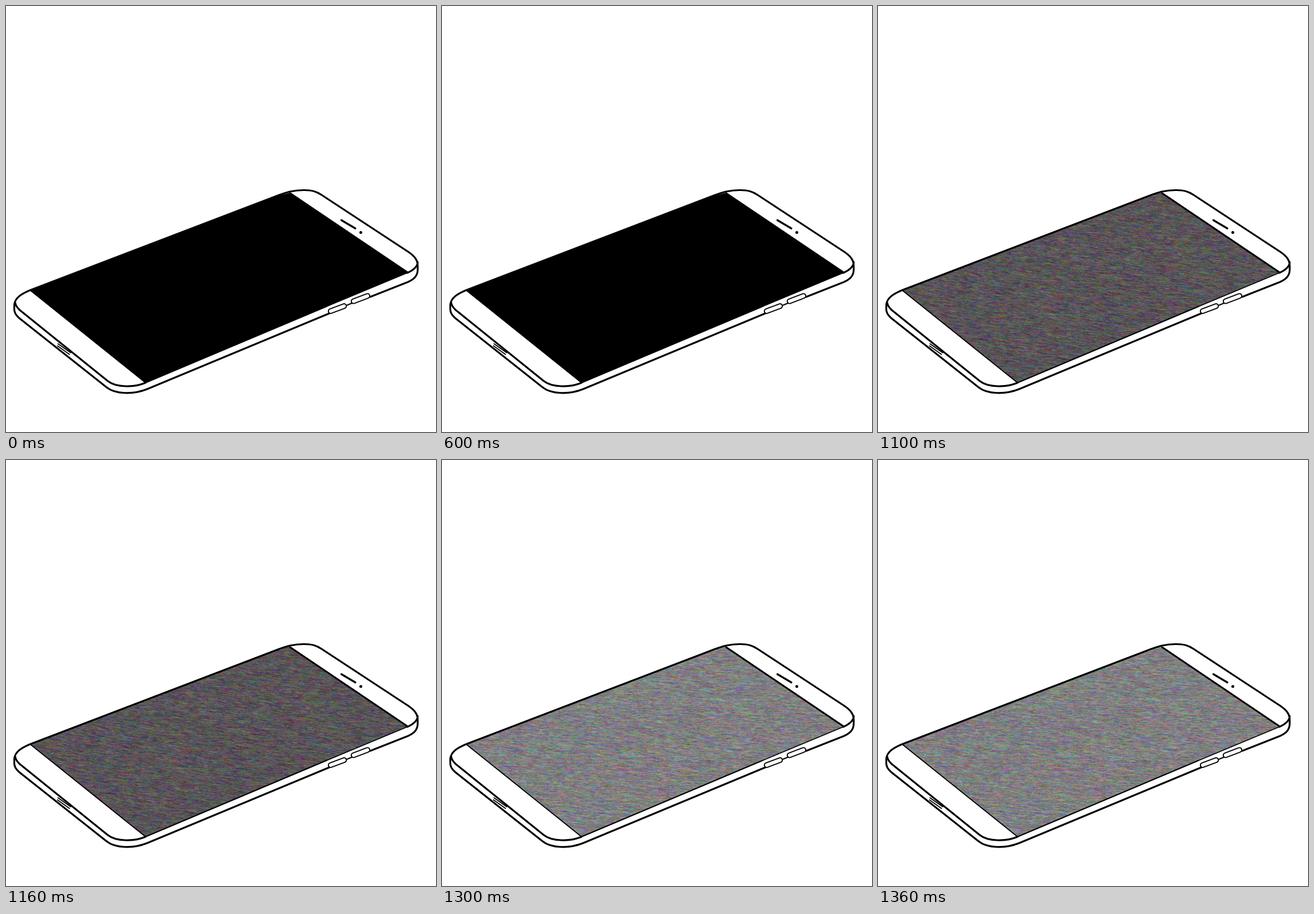
Animation, 752 px wide and 744 px high, one loop 1.4 s. Source, as an HTML page with a canvas:

```html
<!DOCTYPE html>
<html lang="en">
<head>
<meta charset="utf-8">
<title>Phone with static</title>
<style>
  html, body { margin: 0; width: 752px; height: 744px; overflow: hidden; background: #fff; }
  canvas { display: block; }
</style>
</head>
<body>
<canvas id="stage" width="752" height="744"></canvas>
<script>
const ctx = document.getElementById('stage').getContext('2d');
const LOOP = 1400, DARK = 1000, STEP = 100;

const screenPath = new Path2D('M43 497 L470 333 L497 326 L702 466 L244 658 Z');
const outerPath = new Path2D(`M43 496 L470 333 C490 325 503 321.5 521 321.5 C535 321.5 543 324 552 330
  L703 429 C715 437 720 444 720 454 V460 C720 471 714 477 703 482 L637 508
  M565 537 L247 669 C222 679 191 678 176 666 L23 545 C16 539 14.5 535 14.5 530 V522 C15.5 510 26 503 43 496`);
const rimPath = new Path2D(`M16 518 C17 525 22 530 29 535 L178 655 C192 666 223 667 244 658
  M702 466 C713 461 720 455 720 447`);

// Each burst of static: mean colour, contrast and slope of the streaks.
const bursts = [
  { mean: [153, 148, 152], contrast: 32, slope: 0.06 },
  { mean: [88, 84, 88], contrast: 19, slope: 0.14 },
  { mean: [151, 148, 149], contrast: 23, slope: 0.06 },
  { mean: [127, 127, 129], contrast: 21, slope: 0.08 }
].map((burst, i) => ({ ...burst, image: makeStatic(burst, 71 + i * 1013) }));

function seededRandom(seed) {
  return () => {
    seed = (seed + 0x6d2b79f5) | 0;
    let t = Math.imul(seed ^ (seed >>> 15), 1 | seed);
    t = (t + Math.imul(t ^ (t >>> 7), 61 | t)) ^ t;
    return ((t ^ (t >>> 14)) >>> 0) / 4294967296;
  };
}

// Coloured noise, smoothed along each row into short streaks.
function makeStatic({ mean, contrast }, seed) {
  const tile = document.createElement('canvas');
  tile.width = 700;
  tile.height = 440;
  const tileCtx = tile.getContext('2d');
  const pixels = tileCtx.createImageData(tile.width, tile.height);
  const random = seededRandom(seed);
  const keep = 0.82, gain = contrast * Math.sqrt(12 * (1 - keep * keep));
  for (let y = 0, p = 0; y < tile.height; y++) {
    const level = [0, 0, 0];
    for (let x = 0; x < tile.width; x++, p += 4) {
      for (let c = 0; c < 3; c++) {
        level[c] = level[c] * keep + (random() - 0.5) * gain;
        pixels.data[p + c] = mean[c] + level[c];
      }
      pixels.data[p + 3] = 255;
    }
  }
  tileCtx.putImageData(pixels, 0, 0);
  return tile;
}

function line(width, x1, y1, x2, y2) {
  ctx.lineWidth = width;
  ctx.beginPath();
  ctx.moveTo(x1, y1);
  ctx.lineTo(x2, y2);
  ctx.stroke();
}

function pill(x, y, length, height, angle) {
  ctx.save();
  ctx.translate(x, y);
  ctx.rotate(angle);
  ctx.lineWidth = 2;
  ctx.beginPath();
  ctx.roundRect(-length / 2, -height / 2, length, height, height / 2);
  ctx.fillStyle = '#fff';
  ctx.fill();
  ctx.stroke();
  ctx.restore();
}

function drawScreen(burst) {
  ctx.fillStyle = '#000';
  ctx.fill(screenPath);
  if (!burst) return;
  ctx.save();
  ctx.clip(screenPath);
  // Start above the screen so the sheared tile covers every corner.
  ctx.transform(1, burst.slope, 0, 1, 30, 290 - burst.slope * 350);
  ctx.drawImage(burst.image, 0, 0);
  ctx.restore();
}

function drawPhone() {
  ctx.strokeStyle = '#000';
  ctx.lineCap = ctx.lineJoin = 'round';
  ctx.lineWidth = 3.2;
  ctx.stroke(outerPath);
  ctx.stroke(rimPath);

  line(1.8, 43, 497, 244, 658);
  line(3, 497, 327, 702, 465);
  line(2.4, 244, 658, 560, 525);
  line(1.6, 560, 525, 702, 466);

  line(3.2, 586.5, 374, 611, 388.5);
  ctx.fillStyle = '#000';
  ctx.beginPath();
  ctx.arc(620.5, 395.5, 2.5, 0, Math.PI * 2);
  ctx.fill();

  line(2, 91, 590, 113, 605.5);
  line(1.8, 90, 593.5, 111, 608.5);

  line(2.4, 594, 523.5, 605, 519);
  pill(579.5, 528.5, 33, 8, -0.36);
  pill(620, 511, 34, 8, -0.36);
}

function draw() {
  const time = performance.now() % LOOP;
  ctx.fillStyle = '#fff';
  ctx.fillRect(0, 0, 752, 744);
  drawScreen(time < DARK ? null : bursts[Math.floor((time - DARK) / STEP)]);
  drawPhone();
  requestAnimationFrame(draw);
}
draw();
</script>
</body>
</html>
```
